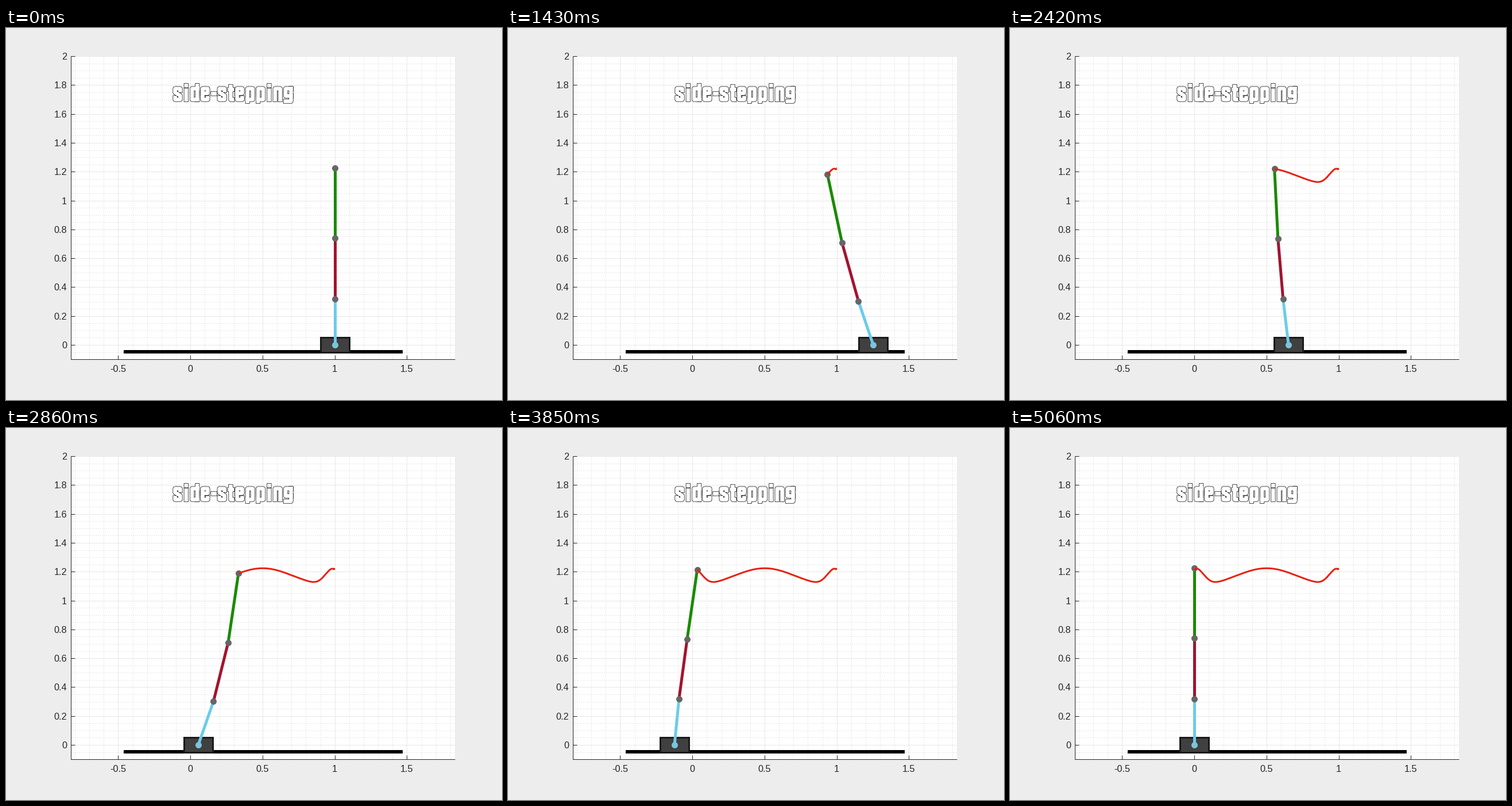
Write a matplotlib script that moves like this. It is 864x648 px and loops after 5170 ms.

```python
import numpy as np
import matplotlib.pyplot as plt
from matplotlib.animation import FuncAnimation
from matplotlib.patches import PathPatch, Rectangle
from matplotlib.path import Path

W, H, DPI = 864, 648, 100
FRAMES, INTERVAL = 47, 110
MID = (FRAMES - 1) / 2
LINKS = np.array([0.32, 0.419, 0.485])
LEFT, TOP, RIGHT, BOTTOM = 113, 49, 782, 576.5


def pt(px):
    return px * 72 / DPI


def sx(x):
    return 321.2 + 251.5 * np.asarray(x)


def sy(y):
    return 552 - 251.4 * np.asarray(y)


# Steps after the midpoint: sines of the three link angles, tip offset.
# The motion is odd about the midpoint.
KEYS = np.array([
    [0, 0, 0, 0, 0],
    [3, 0.329, 0.242, 0.1475, -0.167],
    [6, 0.503, 0.389, 0.254, -0.329],
    [8, 0.478, 0.370, 0.254, -0.392],
    [14, -0.099, 0.0142, 0.082, -0.485],
    [16, -0.1925, -0.052, 0.040, -0.493],
    [20, -0.080, -0.035, -0.004, -0.499],
    [23, 0, 0, 0, -0.5],
])
KEYS = np.vstack([-KEYS[:0:-1], KEYS])


def slopes(x, y):
    """Slopes of a cubic spline that rests at both ends."""
    n = len(x)
    a, b = np.eye(n), np.zeros_like(y)
    h = np.diff(x)
    for i in range(1, n - 1):
        p, q = h[i - 1], h[i]
        a[i, i - 1:i + 2] = 1 / p, 2 / p + 2 / q, 1 / q
        b[i] = 3 * ((y[i] - y[i - 1]) / p**2 + (y[i + 1] - y[i]) / q**2)
    return np.linalg.solve(a, b)


KX, KY = KEYS[:, 0], KEYS[:, 1:]
KM = slopes(KX, KY)


def spline(t):
    i = np.clip(np.searchsorted(KX, t, side="right") - 1, 0, len(KX) - 2)
    h = (KX[i + 1] - KX[i])[:, None]
    s = (t - KX[i])[:, None] / h
    return ((1 + 2 * s) * (1 - s)**2 * KY[i] + s * (1 - s)**2 * h * KM[i]
            + s**2 * (3 - 2 * s) * KY[i + 1] + s**2 * (s - 1) * h * KM[i + 1])


def pose(n):
    """Pixel positions of the cart pivot, both joints and the tip."""
    v = spline(np.atleast_1d(n).astype(float) - MID)
    sin = v[:, :3]
    dx, dy = LINKS * sin, LINKS * np.sqrt(1 - sin**2)
    x = (0.5 + v[:, 3] - dx.sum(axis=1))[:, None]
    x = np.hstack([x, x + np.cumsum(dx, axis=1)])
    y = np.hstack([np.zeros((len(v), 1)), np.cumsum(dy, axis=1)])
    return sx(x), sy(y)


fig = plt.figure(figsize=(W / DPI, H / DPI), dpi=DPI, facecolor="#ededed")
ax = fig.add_axes([0, 0, 1, 1])
ax.set_xlim(0, W)
ax.set_ylim(H, 0)
ax.axis("off")


def line(x, y, color, px, z, **kw):
    kw.setdefault("solid_capstyle", "butt")
    return ax.plot(x, y, color=color, lw=pt(px), zorder=z, **kw)[0]


def draw_axes():
    ax.add_patch(Rectangle((LEFT, TOP), RIGHT - LEFT, BOTTOM - TOP,
                           fc="white", ec="none", zorder=0))
    ink = "#262626"
    minor = dict(color="#d8d8d8", px=1, z=1, ls=(0, (1.2, 2.4)))
    major = dict(color="#e7e7e7", px=1, z=1.2)
    font = dict(family="Liberation Sans", size=pt(16.2), color=ink, zorder=9)
    for k in range(-8, 19):
        x = float(sx(k / 10))
        style = minor if k % 5 else major
        line([x, x], [TOP, BOTTOM], **style)
        if k % 5 == 0:
            line([x, x], [BOTTOM, BOTTOM - 6.5], ink, 1, 2)
            ax.text(x, 599, f"{k / 10:g}", ha="center", va="baseline", **font)
    for k in range(-1, 41):
        y = float(sy(k / 20))
        style = minor if k % 4 else major
        line([LEFT, RIGHT], [y, y], **style)
        if k % 4 == 0:
            line([LEFT, LEFT + 6.5], [y, y], ink, 1, 2)
            ax.text(106, y + 6, f"{k / 20:g}", ha="right", va="baseline", **font)
    line([LEFT, LEFT, RIGHT], [TOP, BOTTOM, BOTTOM], ink, 1, 2)


# Heavy condensed letters as pen strokes, measured up from the baseline.
A, B, LO, HI = 3.5, 12.5, 3.5, 22.4
GLYPHS = {
    "s": [[(B, 19.4), (B, HI), (A, HI), (A, 15.6), (B, 10.4), (B, LO),
           (A, LO), (A, 6.5)]],
    "i": [[(4.5, 3.3), (4.5, 19.6)], [(4.5, 27.6), (4.5, 27.8)]],
    "d": [[(B, 3.3), (B, 27.7)], [(B, HI), (A, HI), (A, LO), (B, LO)]],
    "e": [[(B, 6.4), (B, LO), (A, LO), (A, HI), (B, HI), (B, 14.4), (A, 14.4)]],
    "-": [[(3.3, 13.6), (6.7, 13.6)]],
    "t": [[(5, 26), (5, 3.3), (7.7, 3.3)], [(3.3, 21), (7.7, 21)]],
    "p": [[(A, 0.3), (A, HI), (B, HI), (B, LO), (A, LO)]],
    "n": [[(A, 3.3), (A, HI), (B, HI), (B, 3.3)]],
    "g": [[(13, HI), (A, HI), (A, 9.6), (13, 9.6)],
          [(13, HI), (13, 0.4), (A, 0.4)]],
}
ADVANCE = {"i": 11.3, "-": 11, "t": 12.5}


def draw_title(text, x, base):
    verts, codes = [], []
    for c in text:
        for stroke in GLYPHS[c]:
            verts += [(x + px, base - py) for px, py in stroke]
            codes += [Path.MOVETO] + [Path.LINETO] * (len(stroke) - 1)
        x += ADVANCE.get(c, 18.3)
    path = Path(verts, codes)
    for color, px, z in (("#222222", 8.2, 3), ("white", 6.6, 3.1)):
        ax.add_patch(PathPatch(path, fc="none", ec=color, lw=pt(px), zorder=z,
                               capstyle="projecting", joinstyle="round"))


draw_axes()
draw_title("side-stepping", 291, 128)
line([204.5, 690.5], [564.2, 564.2], "black", 6, 4)

cart = Rectangle((0, 539.4), 50.4, 25.2, fc="#404040", ec="#1a1a1a",
                 lw=pt(3), joinstyle="miter", zorder=5)
ax.add_patch(cart)
rods = [line([], [], c, 5, 6) for c in ("#6ccbea", "#a2142f", "#1a8a00")]
dots = [ax.plot([], [], "o", ms=pt(11), mew=0, color=c, zorder=7)[0]
        for c in ("#7cc3da", "#666666", "#666666", "#666666")]
trail = line([], [], "#e8200f", 3, 8, solid_joinstyle="round")


def update(n):
    x, y = (p[0] for p in pose(n))
    cart.set_x(x[0] - 25.2)
    for i, rod in enumerate(rods):
        rod.set_data(x[i:i + 2], y[i:i + 2])
    for i, dot in enumerate(dots):
        dot.set_data([x[i]], [y[i]])
    if n:
        tx, ty = pose(np.linspace(0, n, 8 * n + 1))
        trail.set_data(tx[:, 3], ty[:, 3])
    else:
        trail.set_data([], [])
    return [cart, trail, *rods, *dots]


anim = FuncAnimation(fig, update, frames=FRAMES, interval=INTERVAL,
                     repeat=True, repeat_delay=0, blit=False)
plt.show()
```
